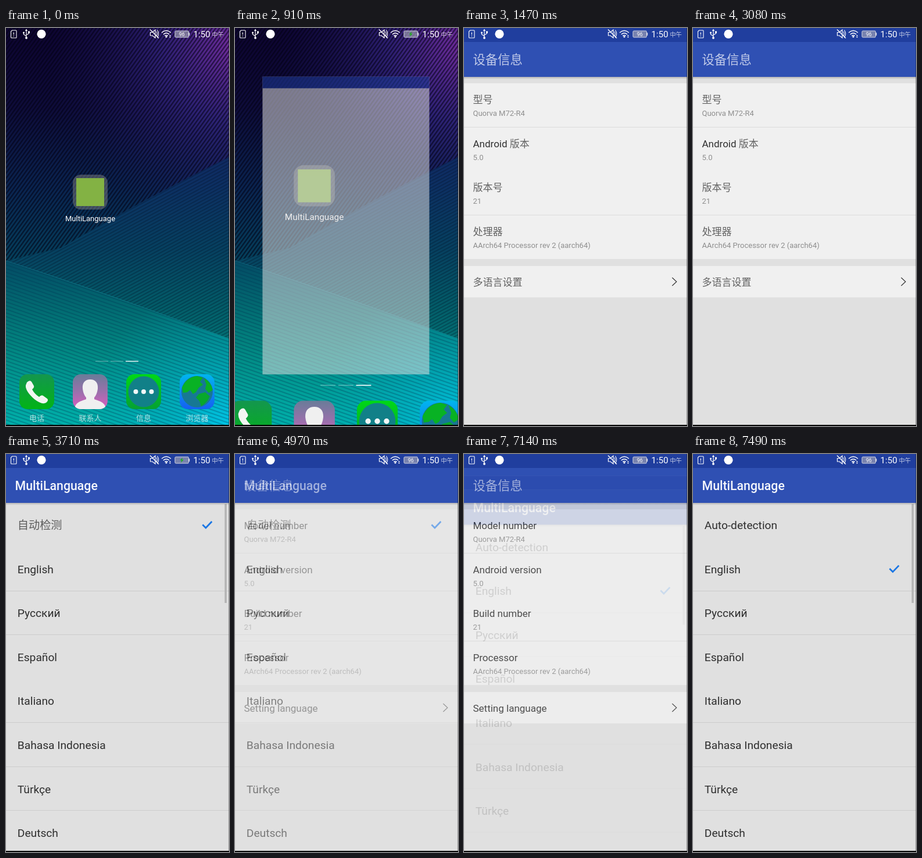
Recreate the animation shown at these times as an HTML page. Size 384 px wide and 684 px high, loop 8000 ms.

```html
<!DOCTYPE html>
<html lang="zh-CN">
<head>
<meta charset="utf-8">
<title>Language settings</title>
<style>
html, body { margin: 0; width: 100%; height: 100%; overflow: hidden; background: #000; }
svg { display: block; width: 100vw; height: 100vh; }
text { font-family: Roboto, 'Noto Sans CJK SC', 'Noto Sans CJK', sans-serif; white-space: pre; }
.cjk { font-weight: 300; fill-opacity: .74; }
</style>
</head>
<body>
<svg id="stage" viewBox="0 0 384 684" xmlns="http://www.w3.org/2000/svg"></svg>
<script>
const W = 384, H = 684, LOOP = 8000, STEP = 70, PITCH = 75.6;

const rect = (x, y, w, h, fill, extra = '') =>
  `<rect x="${x}" y="${y}" width="${w}" height="${h}" fill="${fill}" ${extra}/>`;
const circle = (x, y, r, fill) => `<circle cx="${x}" cy="${y}" r="${r}" fill="${fill}"/>`;
const path = (d, fill, extra = '') => `<path d="${d}" fill="${fill}" ${extra}/>`;
const line = (d, color, width, extra = '') =>
  path(d, 'none', `stroke="${color}" stroke-width="${width}" ${extra}`);
// Chinese runs are softened to read as a light weight.
const text = (s, x, y, size, fill, extra = '') =>
  `<text x="${x}" y="${y}" font-size="${size}" fill="${fill}" ${extra}>` +
  s.replace(/[\u4e00-\u9fff]+/g, '<tspan class="cjk">$&</tspan>') + '</text>';
const group = (id, body) => `<g id="${id}">${body}</g>`;

const gradient = (id, stops, dir = 'x2="0" y2="1"') =>
  `<linearGradient id="${id}" ${dir}>` +
  stops.map(([o, c, a = 1]) => `<stop offset="${o}" stop-color="${c}" stop-opacity="${a}"/>`).join('') +
  '</linearGradient>';
const glow = (id, x, y, r, stops) =>
  `<radialGradient id="${id}" gradientUnits="userSpaceOnUse" cx="${x}" cy="${y}" r="${r}">` +
  stops.map(([o, c, a]) => `<stop offset="${o}" stop-color="${c}" stop-opacity="${a}"/>`).join('') +
  '</radialGradient>';
const stripes = (id, angle, gap, width, color) =>
  `<pattern id="${id}" width="20" height="${gap}" patternUnits="userSpaceOnUse" patternTransform="rotate(${angle})">
  ${rect(0, 0, 20, width, color)}</pattern>`;

const defs = `<defs>
${gradient('sky', [[0, '#0d0430'], [.2, '#0e0c3a'], [.4, '#0a2450'], [.56, '#053c5a'], [.7, '#036068'], [.85, '#038a84'], [1, '#00a8a0']])}
${gradient('tide', [[0, '#005c74', .35], [.5, '#008c84', .5], [1, '#00b4b0', .7]])}
${gradient('wedge', [[0, '#14408a', .4], [.5, '#084a6c', .35], [1, '#005868', .25]])}
${glow('violet', 400, 30, 330, [[0, '#8a34b4', .85], [.4, '#43309c', .6], [1, '#1c1c64', 0]])}
${glow('cyan', 384, 690, 250, [[0, '#00c8f0', .9], [.4, '#00b4d4', .5], [1, '#00a0b8', 0]])}
${stripes('steep', -54, 5.2, 2.3, 'rgba(2,0,18,.58)')}
${stripes('mild', -28, 5, 1.7, 'rgba(0,8,30,.32)')}
${stripes('gentle', 19, 6, 1.8, 'rgba(0,50,80,.32)')}
${gradient('phone', [[0, '#14964e'], [1, '#02b416']])}
${gradient('people', [[0, '#697c98'], [.5, '#9a70ac'], [1, '#dc5cc0']])}
${gradient('chat', [[0, '#00d816'], [1, '#06a034']])}
${gradient('web', [[0, '#00b6ee'], [1, '#1560f2']])}
${gradient('shade', [[0, '#000', .2], [1, '#000', 0]])}
<clipPath id="tile">${rect(-30, -30, 60, 60, '#000', 'rx="14"')}</clipPath>
</defs>`;

const upper = 'M0 0H384V222Q230 298 95 378L0 400Z';
const middle = 'M384 222Q230 298 95 378L0 400Q180 458 384 534Z';
const lower = 'M0 400Q180 458 384 534V684H0Z';
const wallpaper =
  rect(0, 0, W, H, 'url(#sky)') + path(upper, 'url(#violet)') + path(upper, 'url(#steep)') +
  path(middle, 'url(#wedge)') + path(middle, 'url(#mild)') +
  path(lower, 'url(#tide)') + path(lower, 'url(#cyan)') + path(lower, 'url(#gentle)') +
  line('M0 400Q180 458 384 534', '#1a8a9c', 1, 'opacity=".5"');

const dockIcon = (x, fill, art, label) =>
  `<g transform="translate(${x} 625)"><g clip-path="url(#tile)">${rect(-30, -30, 60, 60, fill)}${art}</g></g>` +
  text(label, x, 674.5, 13, '#eef8f8', 'text-anchor="middle"');

const handset = path('M-17 -16Q-12 -21 -9 -17L-5 -10Q-4 -7 -8 -4Q-4 4 4 9Q8 5 11 7L18 12Q21 15 16 19Q9 23 -4 13Q-20 -1 -19 -11Z', '#f2f6f2');
const person = path('M0 -21C9 -21 14 -15 13 -5C12 3 9 8 7 10V13C14 16 26 17 27 30H-27C-26 17 -14 16 -7 13V10C-9 8 -12 3 -13 -5C-14 -15 -9 -21 0 -21Z', '#f0f0f0');
const dots = circle(0, 0, 26.5, '#118088') + [-13.5, 0, 13.5].map(x => circle(x, 0, 4, '#f2f6f6')).join('');
const globe = circle(0, 0, 27, '#177894') +
  path('M-26 -7Q-18 -25 0 -27L10 -24L5 -17L10 -12L3 -7L-2 1L-7 4L-12 -3L-17 1L-24 2Z', '#08b224') +
  path('M12 -23Q24 -17 27 -3L20 2L14 -5L16 -12Z', '#08b224') +
  path('M3 4L14 1L22 8Q17 20 7 25L4 16L-2 10Z', '#08a82c');

const icons =
  rect(115, 252, 60, 60, '#8a8a86', 'rx="14" opacity=".45"') +
  rect(121, 258, 48, 48, '#83b244') +
  text('MultiLanguage', 145, 332, 13, '#fff', 'text-anchor="middle"') +
  [154, 180, 206].map((x, i) => rect(x, 572, 22, 1.4, '#fff', `opacity="${i < 2 ? .3 : .95}"`)).join('') +
  dockIcon(53, 'url(#phone)', handset, '电话') +
  dockIcon(145, 'url(#people)', person, '联系人') +
  dockIcon(237, 'url(#chat)', dots, '信息') +
  dockIcon(329, 'url(#web)', globe, '浏览器');

const header = title =>
  rect(0, 0, W, 24, '#203e9e') + rect(0, 24, W, 60, '#2f50b3') + rect(0, 84, W, 4, 'url(#shade)') +
  text(title, 15.5, 62, 21.3, '#f4f6fc', 'font-weight="500"');

const labels = [
  ['型号', 'Android 版本', '版本号', '处理器', '多语言设置'],
  ['Model number', 'Android version', 'Build number', 'Processor', 'Setting language']
];
const values = ['Quorva M72-R4', '5.0', '21', 'AArch64 Processor rev 2 (aarch64)'];
const labelSet = (names, id) => group(id, names.map((s, i) =>
  text(s, 15.5, i < 4 ? 129 + i * PITCH : 442.5, 17, '#303030')).join(''));

const info =
  rect(0, 0, W, H, '#e0e0e0') + rect(0, 95, W, 302, '#f0f0f0') + rect(0, 409, W, 54, '#f0f0f0') +
  rect(0, 170, W, 1, '#dcdcdc') + rect(0, 321, W, 1, '#dcdcdc') +
  rect(0, 409, W, 54, '#cfcfcf', 'id="press"') +
  labelSet(labels[0], 'zh') + labelSet(labels[1], 'en') +
  values.map((s, i) => text(s, 15.5, 151 + i * PITCH, 13, '#8e8e8e')).join('') +
  line('M358.5 429L366 436L358.5 443', '#333', 1.2) + header('设备信息');

const languages = ['English', 'Русский', 'Español', 'Italiano', 'Bahasa Indonesia', 'Türkçe', 'Deutsch'];
const rowText = (s, i, extra) => text(s, 19.8, 129 + i * PITCH, 19.2, '#2e2e2e', extra);
const list =
  rect(0, 0, W, H, '#e0e0e0') + rect(0, 160, W, 75, '#cfcfcf', 'id="rowPress"') +
  [235, 310, 461, 537, 612].map(y => rect(0, y, W, 1, '#cccccc')).join('') +
  rowText('自动检测', 0, 'id="autoZh"') + rowText('Auto-detection', 0, 'id="autoEn"') +
  languages.map((s, i) => rowText(s, i + 1)).join('') +
  line('M338.5 121.5L344 127L354.5 116', '#1a76e4', 2.8, 'id="check"') +
  rect(376.5, 86, 3.5, 170, '#b4b4b4', 'id="bar"') + header('MultiLanguage');

const arc = (r, y) => line(`M${276 - r} ${y}Q276 ${y - r * .85} ${276 + r} ${y}`, '#fff', 1.4);
const status =
  line('M10.5 4H17Q18 4 18 5V16Q18 17 17 17H9.5Q8.5 17 8.5 16V6Z', '#fff', 1.1) +
  line('M13.3 7.5V11.5M13.3 13V14.3', '#fff', 1.2) +
  line('M35 4V17M35 14L30.5 11V8M35 12L39.5 9.5V6.5', '#fff', 1.2) +
  path('M35 1.5L37.2 5H32.8Z', '#fff') + circle(35, 17, 1.9, '#fff') + circle(30.5, 8, 1.5, '#fff') + rect(38, 5.5, 3, 3, '#fff') +
  circle(61, 10.3, 7.6, '#fff') +
  line('M248.5 7.5H252L257 3V17L252 13H248.5Z', '#fff', 1.2) +
  line('M259 6Q261.5 10 259 14M260.5 3.5Q265 10 260.5 16.5', '#fff', 1.1) + line('M248 2.5L263 17.5', '#fff', 1.4) +
  arc(8, 8) + arc(5.2, 11) + arc(2.6, 13.6) + circle(276, 15.2, 1.4, '#fff') +
  group('arrows', path('M281 14L282.5 11.8L284 14Z', '#fff') + path('M281 15L282.5 17L284 15Z', '#fff')) +
  rect(291, 5, 23.5, 11, '#a6a8b8', 'fill-opacity=".65" stroke="#d4d6e4" rx="1.5"') + rect(315, 8, 1.3, 5, '#d4d6e4') +
  group('bolt', path('M304 6L299.5 11H302.3L300.8 15.2L306 9.8H303Z', '#20ac20')) +
  text('96', 302.7, 14, 9, '#fff', 'id="level" text-anchor="middle"') +
  text('1:50', 322.5, 15.5, 15.2, '#fff') + text('中午', 354.5, 15, 10.3, '#fff');

document.getElementById('stage').innerHTML = defs +
  group('home', wallpaper + group('icons', icons)) +
  group('win', rect(0, 0, W, H, '#e0e0e0') + rect(0, 0, W, 26.6, '#203e9e') + group('info', info)) +
  group('list', list) + group('status', status) +
  rect(383, 0, 1, H, 'rgba(0,0,0,.28)') + rect(0, 682, W, 2, '#000');

const el = id => document.getElementById(id);
const clamp = v => Math.max(0, Math.min(1, v));
const ramp = (t, from, length) => clamp((t - from) / length);
const easeOut = p => 1 - (1 - p) ** 2;
const within = (t, ...spans) => spans.some(([a, b]) => t >= a && t < b);
const fade = (id, a) => {
  el(id).setAttribute('opacity', a);
  el(id).setAttribute('display', a > 0 ? 'inline' : 'none');
};
const show = (id, on) => fade(id, on ? 1 : 0);
const move = (id, value) => el(id).setAttribute('transform', value);
const zoom = (x, y, s) => `translate(${x * (1 - s)} ${y * (1 - s)}) scale(${s})`;

function render(t) {
  // Launch: the preview window grows while the icons spread out.
  const launch = ramp(t, 770, 350), grow = easeOut(launch);
  const opening = t >= 840;
  fade('win', opening ? clamp(launch * 1.32) : 0);
  move('win', zoom(188, 332, .3 + .7 * grow));
  move('icons', zoom(192, 342, opening ? 1 + .28 * grow : 1));
  fade('info', ramp(t, 1120, 210));

  const english = t >= 4760;
  show('zh', !english);
  show('en', english);
  fade('press', within(t, [2310, 3080], [6300, 6720]) ? 1 : within(t, [2240, 2310], [6230, 6300]) ? .5 : 0);

  // The list enters twice and fades away once.
  let enter = 0, alpha = 0;
  if (t >= 7140) alpha = enter = ramp(t, 7070, 420);
  else if (t >= 4760) { enter = 1; alpha = 1 - ramp(t, 4760, 490); }
  else if (t >= 3220) alpha = enter = Math.max(.06, ramp(t, 3360, 350));
  fade('list', alpha);
  move('list', `translate(0 ${54 * (1 - easeOut(enter))})`);
  const second = t >= 7140;
  show('autoZh', !second);
  show('autoEn', second);
  move('check', `translate(0 ${second ? PITCH : 0})`);
  show('bar', t < 4480 || second);
  show('rowPress', within(t, [4760, 4970]));

  const charging = within(t, [560, 1470], [3220, 4760], [5810, 7140]);
  show('bolt', charging);
  show('level', !charging);
  show('arrows', !within(t, [560, 1470], [2240, 2310], [6230, 7140]));
}

function tick() {
  const t = performance.now() % LOOP;
  render(Math.floor(t / STEP) * STEP);
  requestAnimationFrame(tick);
}
tick();
</script>
</body>
</html>
```
